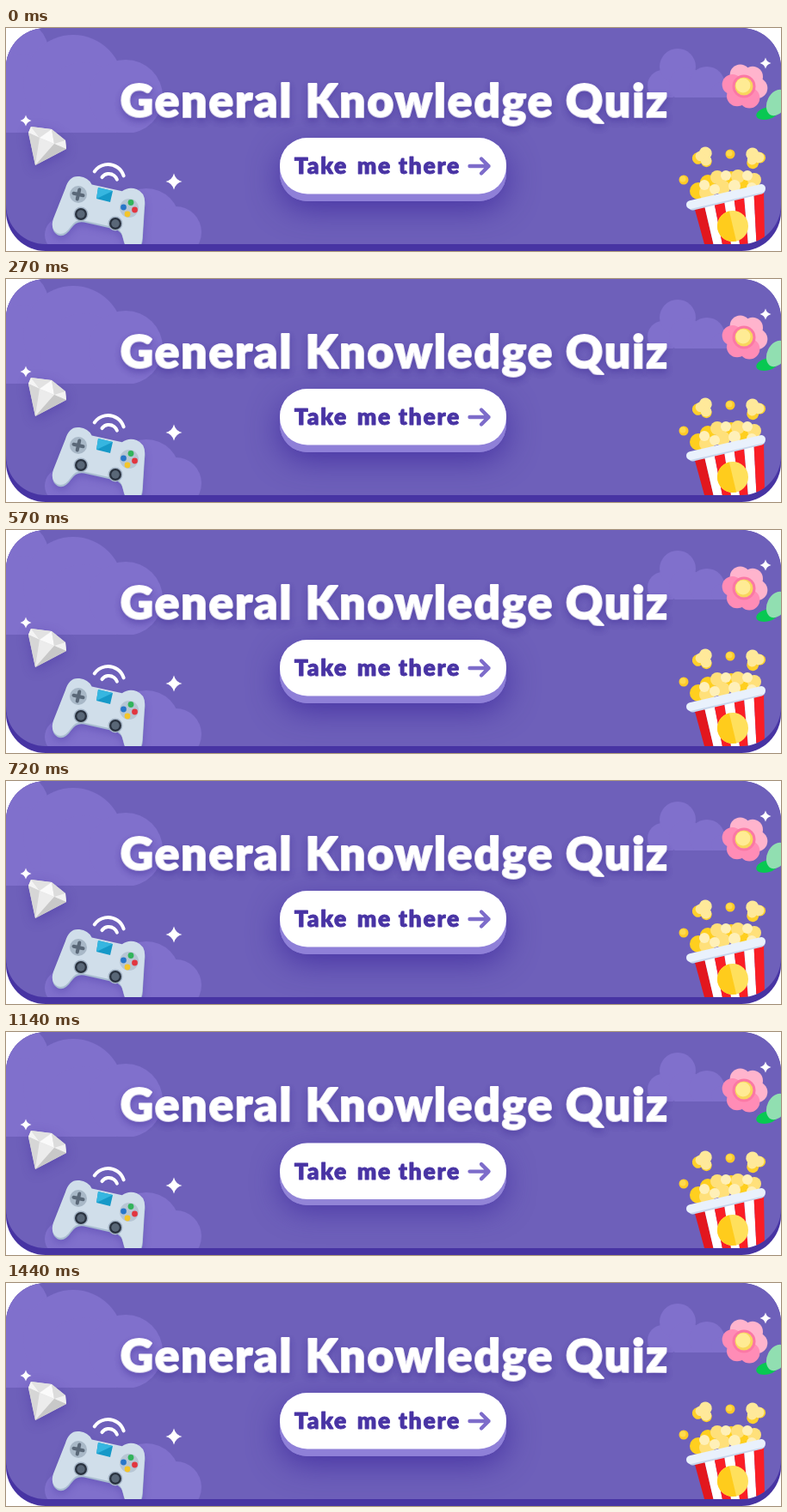
Animation, 900 px wide and 260 px high, one loop 1470 ms. Source, as an HTML page with a canvas:

```html
<!DOCTYPE html>
<html lang="en">
<head>
<meta charset="utf-8">
<title>General Knowledge Quiz</title>
<style>
html, body { margin: 0; width: 100%; height: 100%; overflow: hidden; background: #fff; }
canvas { display: block; }
</style>
</head>
<body>
<canvas id="stage" width="900" height="260"></canvas>
<script>
const canvas = document.getElementById('stage');
const LOOP = 1470, STEP = 30;
const PRESS_START = 1080, PRESS_END = 1440, PRESS_DEPTH = 6.4;
const TITLE_FONT = '900 53px Lato, "Open Sans", sans-serif';
const BUTTON_FONT = '900 26.5px Lato, "Open Sans", sans-serif';
let ctx = canvas.getContext('2d');

function fill(color, path) {
  ctx.beginPath();
  path();
  ctx.fillStyle = color;
  ctx.fill();
}

function disc(x, y, r, color) {
  fill(color, () => ctx.arc(x, y, r, 0, Math.PI * 2));
}

function discs(color, list) {
  for (const [x, y, r] of list) disc(x, y, r, color);
}

function oval(x, y, rx, ry, turn, color) {
  fill(color, () => ctx.ellipse(x, y, rx, ry, turn, 0, Math.PI * 2));
}

function box(x, y, w, h, r, color) {
  fill(color, () => ctx.roundRect(x, y, w, h, r));
}

function poly(color, ...points) {
  fill(color, () => points.forEach(([x, y]) => ctx.lineTo(x, y)));
}

function line(color, width, path) {
  ctx.beginPath();
  path();
  ctx.strokeStyle = color;
  ctx.lineWidth = width;
  ctx.lineCap = ctx.lineJoin = 'round';
  ctx.stroke();
}

function shadow(color, blur, y, draw) {
  ctx.save();
  ctx.shadowColor = color;
  ctx.shadowBlur = blur;
  ctx.shadowOffsetY = y;
  draw();
  ctx.restore();
}

// Words are centred one by one; a thin round outline softens the corners.
function words(font, color, y, outline, spacing, list) {
  ctx.font = font;
  ctx.textAlign = 'left';
  ctx.letterSpacing = spacing + 'px';
  for (const [word, center] of list) {
    const x = center - (ctx.measureText(word).width - spacing) / 2;
    ctx.fillStyle = ctx.strokeStyle = color;
    ctx.lineWidth = outline;
    ctx.lineJoin = 'round';
    ctx.strokeText(word, x, y);
    ctx.fillText(word, x, y);
  }
  ctx.letterSpacing = '0px';
}

function sparkle(x, y, r) {
  const k = r * 0.2;
  fill('#fff', () => {
    ctx.moveTo(x, y - r);
    ctx.quadraticCurveTo(x + k, y - k, x + r, y);
    ctx.quadraticCurveTo(x + k, y + k, x, y + r);
    ctx.quadraticCurveTo(x - k, y + k, x - r, y);
    ctx.quadraticCurveTo(x - k, y - k, x, y - r);
  });
}

// A group of circles cut off flat at its base line.
function cloud(base, circles) {
  ctx.save();
  ctx.beginPath();
  ctx.rect(0, 0, 900, base);
  ctx.clip();
  discs('#8070cc', circles);
  ctx.restore();
}

function clouds() {
  cloud(122, [[8, 30, 42], [20, 90, 60], [78, 66, 58], [90, 90, 50], [139, 80, 43]]);
  cloud(81, [[763, 67, 18], [780, 45, 21], [790, 66, 20], [814, 66, 21], [830, 74, 11]]);
  cloud(252, [[65, 241, 20], [108, 240, 34], [163, 226, 39], [197, 238, 30]]);
}

function diamond() {
  const left = [26, 122], crown = [29, 115], top = [53, 118], shoulder = [69, 131], right = [70, 141];
  const inner = [39, 128], outer = [56, 135], tip = [34, 160];
  shadow('rgba(70,52,160,.45)', 14, 4, () => poly('#e0e0e0', left, crown, top, shoulder, right, tip));
  poly('#f4f4f4', left, crown, inner);
  poly('#e2e2e2', crown, top, inner);
  poly('#fafafa', inner, top, outer);
  poly('#dcdcdc', top, shoulder, outer);
  poly('#f2f2f2', outer, shoulder, right);
  poly('#d6d6d6', left, inner, tip);
  poly('#ececec', inner, outer, tip);
  poly('#c8c8c8', outer, right, tip);
}

function controller() {
  line('#fff', 4, () => ctx.arc(118.5, 178, 19, -2.55, -0.3));
  line('#fff', 4, () => ctx.arc(119.5, 180, 10, -2.5, -0.35));
  ctx.save();
  ctx.translate(113, 209);
  ctx.rotate(0.22);
  const body = () => {
    ctx.moveTo(-34, -27);
    ctx.quadraticCurveTo(-24, -28, -18, -21);
    ctx.lineTo(18, -21);
    ctx.quadraticCurveTo(24, -28, 34, -27);
    ctx.quadraticCurveTo(46, -25, 47, -10);
    ctx.lineTo(53, 28);
    ctx.quadraticCurveTo(54, 43, 43, 44);
    ctx.quadraticCurveTo(36, 43, 31, 32);
    ctx.quadraticCurveTo(27, 22, 18, 22);
    ctx.lineTo(-18, 22);
    ctx.quadraticCurveTo(-27, 22, -31, 32);
    ctx.quadraticCurveTo(-36, 45, -45, 43);
    ctx.quadraticCurveTo(-54, 40, -53, 28);
    ctx.lineTo(-47, -10);
    ctx.quadraticCurveTo(-46, -26, -34, -27);
  };
  shadow('rgba(70,52,160,.35)', 8, 4, () => fill('#a9bdd0', body));
  ctx.translate(-0.8, -2);
  fill('#d0deea', body);
  ctx.restore();

  disc(84, 194, 10, '#a8b8c7');
  line('#5a6878', 4, () => {
    ctx.moveTo(78.5, 192.7); ctx.lineTo(89.5, 195.3);
    ctx.moveTo(85.3, 188.5); ctx.lineTo(82.7, 199.5);
  });
  for (const [x, y] of [[87, 217], [127, 228]]) {
    disc(x, y, 8.5, '#a5b5c6');
    disc(x, y, 7, '#29323f');
    disc(x, y, 4.7, '#596777');
  }
  poly('#1699c8', [107, 186], [124, 190], [121, 203], [105, 199]);
  poly('#36b6e0', [107, 186], [124, 190], [105, 199]);
  disc(143, 210, 11, '#b7c6d4');
  disc(136.5, 209, 3.4, '#2876c9');
  disc(145, 203.5, 3.4, '#32b45b');
  disc(149.5, 212, 3.4, '#e2353f');
  disc(141, 217, 3.4, '#f4c52b');
}

function flower() {
  oval(884, 99.5, 13, 7, -0.25, '#08c852');
  oval(895, 87, 11, 16, 0.45, '#91dfb1');
  for (let i = 0; i < 6; i++) {
    const angle = Math.PI * (i / 3 - 0.62);
    const x = 858 + 14.5 * Math.cos(angle), y = 68 + 14.5 * Math.sin(angle);
    disc(x, y, 12, i < 3 ? '#ffb4cd' : '#ff8cb6');
  }
  disc(857, 68, 13.5, '#fb78a5');
  disc(857, 68, 10.5, '#f8d65d');
  disc(856, 67, 8.5, '#ffeb94');
}

function kernel(x, y, size, turn) {
  ctx.save();
  ctx.translate(x, y);
  ctx.rotate(turn);
  ctx.scale(size, size);
  discs('#ffd02c', [[-4, 4, 6], [5, 3, 5.5]]);
  discs('#ffe99a', [[0, -4, 6.5], [4, 2, 5.5], [-3, 1, 5]]);
  ctx.restore();
}

function popcorn() {
  kernel(810, 150, 1.15, 0.5);
  kernel(869, 151, 1.15, -0.5);
  for (const [x, y] of [[841, 147], [787, 177]]) {
    disc(x, y, 5.5, '#ffc928');
    disc(x - 1, y - 1, 3.5, '#ffda4f');
  }
  discs('#ffcf1f', [[804, 190, 10], [815, 180, 9], [842, 177, 10], [862, 178, 9], [853, 188, 9]]);
  discs('#ffe07a', [[814, 192, 9], [826, 174, 8], [832, 186, 9], [850, 173, 8], [869, 177, 8]]);
  discs('#fff0b8', [[811, 183, 6], [836, 172, 6], [823, 188, 6], [846, 184, 7], [861, 172, 6], [866, 186, 6]]);

  // Striped cup, tapering towards the bottom.
  const top = k => [799 + 81 * k, 208 - 20 * k];
  const bottom = k => [814 + 67 * k, 263 - 15 * k];
  for (let i = 0; i < 7; i++) {
    const k = i / 7, next = (i + 1) / 7;
    poly(i % 2 ? '#fff' : i ? '#fa1e25' : '#e2171e', top(k), top(next), bottom(next), bottom(k));
  }
  line('#c7d6ec', 9, () => { ctx.moveTo(797, 208); ctx.lineTo(877, 189); });
  line('#e9f1fc', 10, () => { ctx.moveTo(795, 206); ctx.lineTo(877, 187); });
  disc(844, 231, 18, '#ffe05c');
  fill('#ffcc1c', () => ctx.arc(844, 231, 18, 1.34, 1.34 + Math.PI));
}

function drawScene() {
  ctx.fillStyle = '#fff';
  ctx.fillRect(0, 0, 900, 260);
  box(0, 0, 900, 260, 46, '#4734a3');
  ctx.save();
  ctx.beginPath();
  ctx.roundRect(0, 0, 900, 252, 46);
  ctx.clip();
  ctx.fillStyle = '#6e60ba';
  ctx.fillRect(0, 0, 900, 260);
  clouds();
  diamond();
  controller();
  flower();
  popcorn();
  sparkle(23, 108, 6.5);
  sparkle(195, 179, 9.5);
  sparkle(882, 41, 6.5);
  ctx.restore();
  shadow('rgba(62,44,150,.38)', 7, 4, () =>
    words(TITLE_FONT, '#fff', 104, 2, 2, [['General', 232], ['Knowledge', 491], ['Quiz', 709]]));
}

function mix(from, to, k) {
  return `rgb(${from.map((v, i) => Math.round(v + (to[i] - v) * k)).join(',')})`;
}

function drawButton(press) {
  const y = PRESS_DEPTH * press;
  shadow(`rgba(65,45,160,${0.9 - 0.6 * press})`, 36 - 16 * press, 8 - 4 * press, () =>
    box(318, 134 + y * 0.5, 263, 68 - y * 0.5, 32, '#8f80d8'));
  box(318, 128 + y, 263, 74 - y, 32, mix([143, 128, 216], [155, 143, 212], press));
  box(318, 128 + y, 263, 65.5, 32, '#fff');
  words(BUTTON_FONT, '#4833a4', 170 + y, 0.8, 1.7, [['Take', 365], ['me', 427], ['there', 491]]);
  line('#7d6cca', 4.4, () => {
    ctx.moveTo(538.5, 161 + y); ctx.lineTo(560.5, 161 + y);
    ctx.moveTo(552, 152.5 + y); ctx.lineTo(560.5, 161 + y); ctx.lineTo(552, 169.5 + y);
  });
}

function pressAt(time) {
  if (time < PRESS_START || time > PRESS_END) return 0;
  const k = (time - PRESS_START) / (PRESS_END - PRESS_START);
  return (1 - Math.cos(k * Math.PI * 2)) / 2;
}

const screen = ctx;
const backdrop = document.createElement('canvas');
backdrop.width = 900;
backdrop.height = 260;
ctx = backdrop.getContext('2d');
drawScene();
ctx = screen;

const start = performance.now();
function frame() {
  const elapsed = (performance.now() - start) % LOOP;
  ctx.drawImage(backdrop, 0, 0);
  drawButton(pressAt(Math.floor(elapsed / STEP) * STEP));
  requestAnimationFrame(frame);
}
frame();
</script>
</body>
</html>
```
